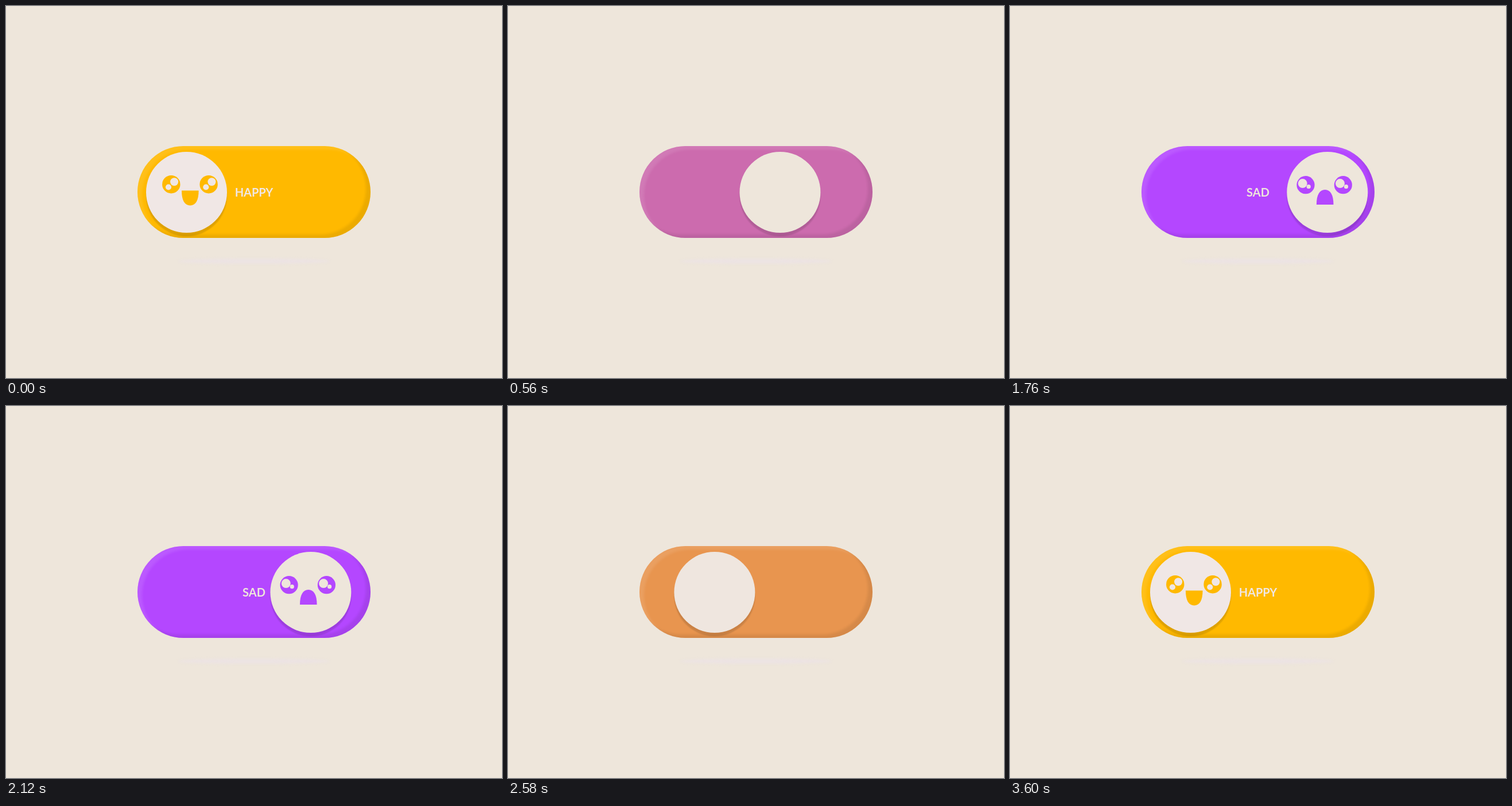
These frames come from a looping animation (864x648 px, 3.62 s). An HTML page:

```html
<!DOCTYPE html>
<html lang="en">
<head>
<meta charset="utf-8">
<title>Mood toggle</title>
<style>
  html, body { margin: 0; width: 100%; height: 100%; overflow: hidden; background: #eee6db; }
  #stage { position: relative; width: 864px; height: 648px; overflow: hidden; }
  #stage div { position: absolute; box-sizing: border-box; }
  #floor { left: 300px; top: 440px; width: 264px; height: 9px; border-radius: 50%; background: #ece3e3; filter: blur(2px); }
  #pill {
    left: 229px; top: 244px; width: 406px; height: 160px; border-radius: 80px;
    background: var(--tone);
    box-shadow: inset 8px 6px 4px rgba(255, 255, 255, .1), inset -8px -6px 4px rgba(0, 0, 0, .08);
  }
  #pill .label {
    width: 100%; text-align: center; font: 700 20px/160px Lato, sans-serif; color: var(--cream);
  }
  #knob {
    left: 14.5px; top: 9.5px; width: 141px; height: 141px; border-radius: 50%;
    background: var(--cream); box-shadow: 0 6px 2px rgba(0, 0, 0, .13);
  }
  svg { position: absolute; inset: 0; border-radius: 50%; overflow: hidden; fill: var(--tone); }
  .shine { fill: var(--cream); }
</style>
</head>
<body>
<div id="stage">
  <div id="floor"></div>
  <div id="pill">
    <div class="label" id="happyLabel">HAPPY</div>
    <div class="label" id="sadLabel">SAD</div>
    <div id="knob">
      <svg width="141" height="141" viewBox="-70.5 -70.5 141 141">
        <defs>
          <g id="happyEye">
            <circle r="15.7"/>
            <g class="shine"><circle cx="5.3" cy="-4.4" r="7"/><circle cx="-4.8" cy="4.8" r="5.1"/></g>
          </g>
          <g id="sadEye">
            <circle r="15.6"/>
            <g class="shine"><circle cx="-5.3" cy="-2.6" r="8"/><circle cx="5.2" cy="3" r="3.6"/></g>
          </g>
          <path id="mouth" d="M-14.8 0H14.8C14.8 17 9.5 26 0 26S-14.8 17 -14.8 0Z"/>
        </defs>
        <g id="happyFace">
          <use href="#happyEye" x="-32.7" y="-13.8"/>
          <use href="#happyEye" x="32.6" y="-13.8"/>
          <use href="#mouth" x=".3" y="-3"/>
        </g>
        <g id="sadFace">
          <use href="#sadEye" x="-32.7" y="-12.8"/>
          <use href="#sadEye" x="32.6" y="-12.8"/>
          <use href="#mouth" transform="translate(1 21.4) scale(1 -1)"/>
        </g>
      </svg>
    </div>
  </div>
</div>
<script>
const LOOP = 3620, TRAVEL = 238.3;
const $ = id => document.getElementById(id);
const ramp = (t, start, length) => Math.min(1, Math.max(0, (t - start) / length));
const easeOut = u => 1 - (1 - u) ** 3;
const easeInOut = u => u < .5 ? 2 * u * u : 1 - 2 * (1 - u) ** 2;
const blend = (a, b, p) => `rgb(${a.map((v, i) => Math.round(v + (b[i] - v) * p))})`;

// The knob is pulled a little way, then let go and glides to the far end.
const toSad = { pull: 20, release: 316, held: .19, glide: 950 };
const toHappy = { pull: 1940, release: 2333, held: .217, glide: 660 };

function slide(t, m) {
  const pulled = m.held * easeInOut(ramp(t, m.pull, m.release - m.pull));
  return pulled + (1 - m.held) * easeOut(ramp(t, m.release, m.glide));
}
const tint = (t, m) => easeOut(ramp(t, m.release, 770));
const hide = (t, m) => 1 - ramp(t, m.release, 65);
const show = (t, m) => ramp(t, m.release + 300, 130);

function wobble(t, start, length) {
  const u = ramp(t, start, length);
  return (1 - u) * Math.cos(2 * Math.PI * u);
}

function setMood(name, opacity, x, y) {
  $(name + "Label").style.opacity = opacity;
  $(name + "Face").style.opacity = opacity;
  $(name + "Face").setAttribute("transform", `translate(${x} ${y})`);
}

function draw(t) {
  const place = slide(t, toSad) - slide(t, toHappy);
  const mood = tint(t, toSad) - tint(t, toHappy);
  const style = $("pill").style;
  style.setProperty("--tone", blend([255, 185, 0], [180, 71, 255], mood));
  style.setProperty("--cream", blend([240, 231, 229], [238, 230, 219], Math.min(1, mood * 2)));
  $("knob").style.transform = `translateX(${place * TRAVEL}px)`;

  const back = t > toHappy.release;
  setMood("happy", back ? show(t, toHappy) : hide(t, toSad),
    6 + (back ? 2.4 * wobble(t, 2840, 760) : 0),
    back ? -.9 * (1 - ramp(t, 2840, 760)) : 0);
  setMood("sad", back ? hide(t, toHappy) : show(t, toSad),
    -5.1 - 4.2 * wobble(t, 1080, 540), 0);
}

function tick() {
  draw(performance.now() % LOOP);
  requestAnimationFrame(tick);
}
tick();
</script>
</body>
</html>
```
